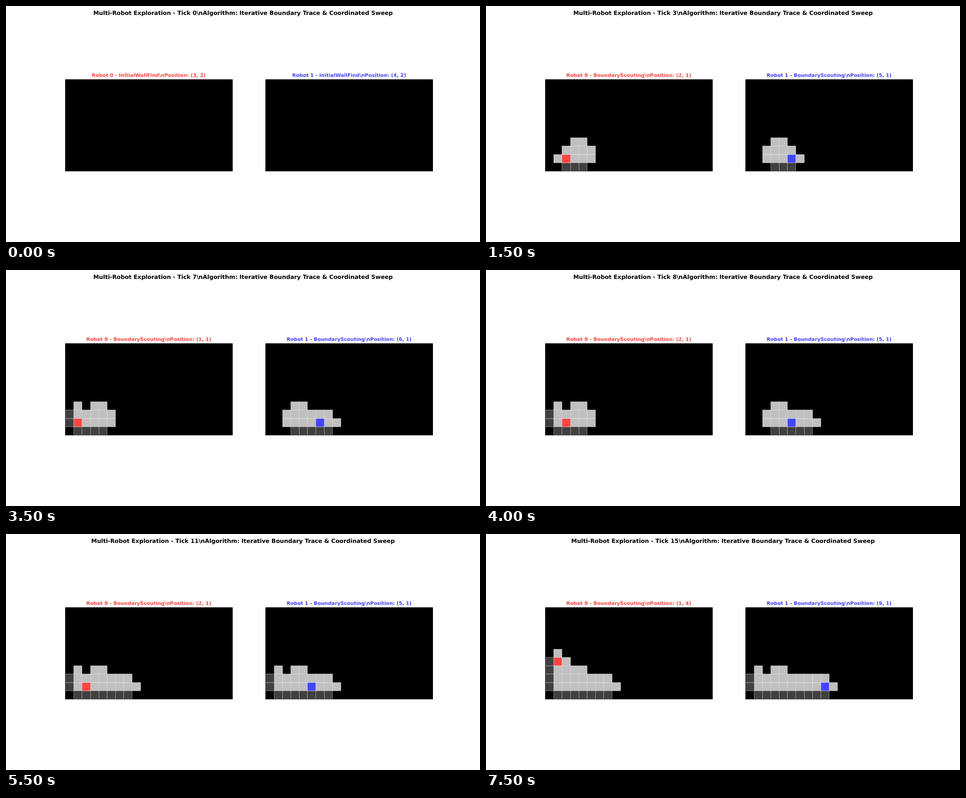
Write an HTML page that moves like this. It is 1058 px wide and 529 px high and loops after 8 s.

```html
<!DOCTYPE html>
<html lang="en">
<head>
<meta charset="utf-8">
<title>Multi-Robot Exploration</title>
<style>
  html, body { margin: 0; width: 100%; height: 100%; overflow: hidden; background: #fff; }
  svg { display: block; width: 1058px; height: 529px; }
  text {
    font-family: "DejaVu Sans", sans-serif;
    font-weight: bold;
    text-anchor: middle;
    text-rendering: geometricPrecision;
    white-space: pre;
  }
  .cell rect { stroke: #fff; stroke-width: 1; stroke-opacity: .69; }
</style>
</head>
<body>
<svg id="stage" viewBox="0 0 1600 800"></svg>
<script>
const TICK_MS = 500, TICKS = 16;
const COLS = 20, ROWS = 11, CELL = 620 / 22;
const PANEL_W = COLS * CELL, BOTTOM = 559;
const FREE = '#c0c0c0', WALL = '#404040';

// Each path entry is "xy", one per tick; y counts up from the bottom row.
const robots = [
  { left: 200, color: '#ff4444',
    path: '32 31 31 21 11 12 12 11 21 31 31 21 11 12 13 14'.split(' ') },
  { left: 1440 - PANEL_W, color: '#4444ff',
    path: '42 41 41 51 61 71 71 61 51 41 41 51 61 71 81 91'.split(' ') }
];
const positionAt = (robot, tick) => [...robot.path[tick]].map(Number);

// Robots sense a plus-shaped area and merge their maps when side by side.
function exploredMaps(tick) {
  const maps = robots.map(() => new Set());
  for (let t = 0; t <= tick; t++) {
    const spots = robots.map(robot => positionAt(robot, t));
    spots.forEach(([x, y], i) => {
      for (const [dx, dy] of [[0, 0], [1, 0], [-1, 0], [0, 1], [0, -1]])
        maps[i].add(`${x + dx},${y + dy}`);
    });
    const [[ax, ay], [bx, by]] = spots;
    if (Math.abs(ax - bx) + Math.abs(ay - by) === 1) {
      const shared = [...maps[0], ...maps[1]];
      maps.forEach(map => shared.forEach(key => map.add(key)));
    }
  }
  return maps;
}

const snap = v => Math.floor(v + .5) + .5;
const rowLine = row => snap(BOTTOM - row * CELL);
const rect = (x, y, w, h, attrs) =>
  `<rect x="${x}" y="${y}" width="${w}" height="${h}" ${attrs}/>`;
const label = (x, y, size, color, text) =>
  `<text x="${x}" y="${y}" font-size="${size}" fill="${color}">${text}</text>`;

function cell(left, x, y, color) {
  const x0 = snap(left + x * CELL), x1 = snap(left + (x + 1) * CELL);
  const y0 = rowLine(y + 1), y1 = rowLine(y);
  return rect(x0, y0, x1 - x0, y1 - y0, `fill="${color}"`);
}

function panel(robot, index, tick, map) {
  const { left, color } = robot;
  const [rx, ry] = positionAt(robot, tick);
  const x0 = snap(left), y0 = rowLine(ROWS);
  const width = snap(left + PANEL_W) - x0, height = rowLine(0) - y0;
  const frame = fill => rect(x0, y0, width, height, `fill="${fill}" stroke="#000" stroke-width="1.11"`);
  const mode = tick < 2 ? 'InitialWallFind' : 'BoundaryScouting';

  let cells = '';
  if (tick > 0) {
    for (const key of map) {
      const [x, y] = key.split(',').map(Number);
      cells += cell(left, x, y, x === 0 || y === 0 ? WALL : FREE);
    }
    cells += cell(left, rx, ry, color);
  }
  return frame('#000') + `<g class="cell">${cells}</g>` + frame('none') +
    label(left + PANEL_W / 2, 241, 16.67, color,
      `Robot ${index} - ${mode}\\nPosition: (${rx}, ${ry})`);
}

const stage = document.getElementById('stage');
let shownTick = -1;

function draw() {
  const tick = Math.floor(performance.now() / TICK_MS) % TICKS;
  if (tick !== shownTick) {
    shownTick = tick;
    const maps = exploredMaps(tick);
    stage.innerHTML =
      label(800, 31, 19.52, '#000',
        `Multi-Robot Exploration - Tick ${tick}\\nAlgorithm: Iterative Boundary Trace &amp; Coordinated Sweep`) +
      robots.map((robot, i) => panel(robot, i, tick, maps[i])).join('');
  }
  requestAnimationFrame(draw);
}
draw();
</script>
</body>
</html>
```
